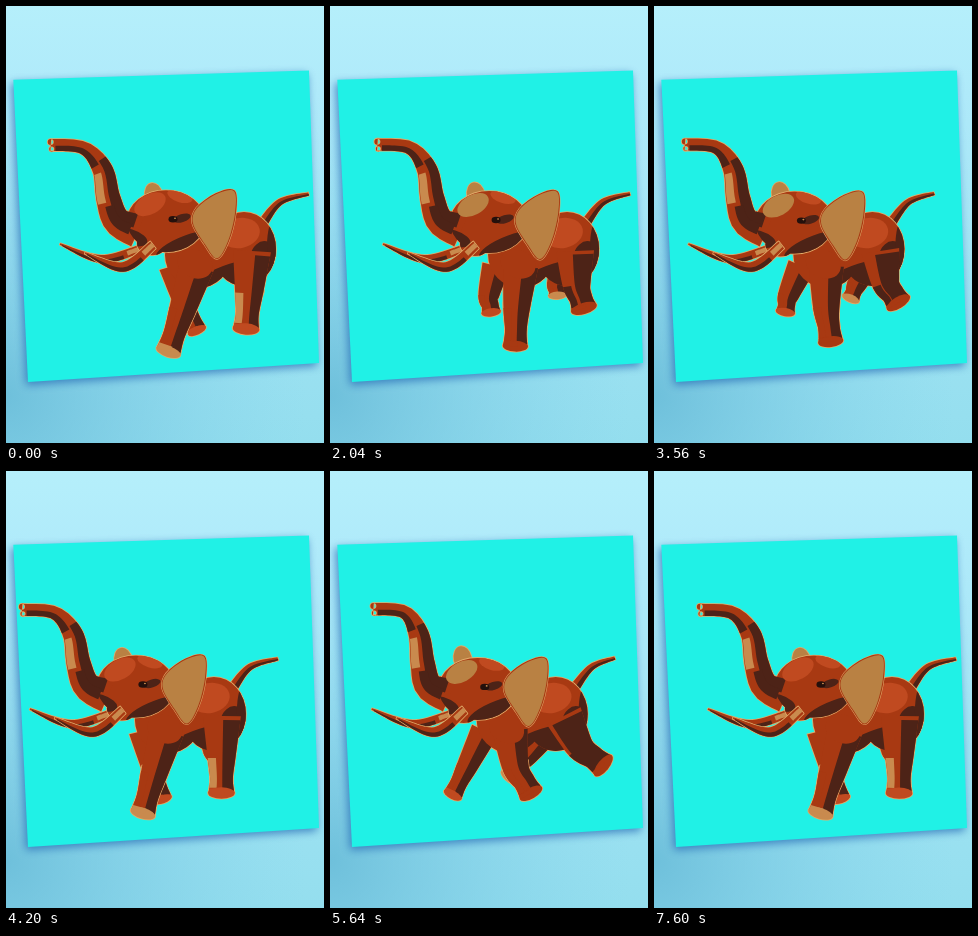
Write an HTML page with a canvas that moves like this. It is 318 by 437 pixels and loops after 7680 ms.

```html
<!DOCTYPE html>
<html lang="en">
<head>
<meta charset="utf-8">
<title>Running elephant</title>
<style>
html, body { margin: 0; width: 100%; height: 100%; overflow: hidden; background: #9fe0f2; }
canvas { display: block; width: 318px; height: 437px; }
</style>
</head>
<body>
<canvas id="stage"></canvas>
<script>
const W = 318, H = 437, LOOP = 7680, STEP = 40, STRIDES = 5;
const canvas = document.getElementById('stage');
const ctx = canvas.getContext('2d');
const ratio = window.devicePixelRatio || 1;
canvas.width = W * ratio;
canvas.height = H * ratio;

const DARK = '#4d2317', RED = '#a83912', ORANGE = '#c04a20', TAN = '#b98143', PALE = '#c98a4e', EDGE = '#e0ac6a';

// Each foot runs round an ellipse; swing and drop are the phases of its foremost and lowest points.
const LEGS = {
  farHind: { hip: [235, 255], foot: [221, 296], reach: 33, lift: 10, swing: .57, drop: .65, width: 13 },
  farFront: { hip: [167, 260], foot: [161, 319], reach: 31, lift: 13, swing: .54, drop: .82, width: 14 },
  nearHind: { hip: [246, 245], foot: [262, 306], reach: 25, lift: 17, swing: .08, drop: 0, width: 19 },
  nearFront: { hip: [192, 256], foot: [189, 335], reach: 28, lift: 13, swing: .05, drop: .1, width: 18 }
};

const wave = x => Math.cos(2 * Math.PI * x);
const bell = (t, mid, spread) => Math.exp(-(((t - mid) / spread) ** 2));
const mix = (a, b, k) => a + (b - a) * k;

// Steady running that lags a little, then hurries while the animal moves forward.
const stride = t => STRIDES * t / LOOP - .08 * Math.sin(Math.PI * t / LOOP) ** 2 + .29 * bell(t, 4250, 680);
const drift = t => -31 * bell(t, 4420, 1270);

function oval(x, y, rx, ry, turn = 0) {
  const path = new Path2D();
  path.ellipse(x, y, rx, ry, turn, 0, 7);
  return path;
}

function join(...paths) {
  const all = new Path2D();
  paths.forEach(p => all.addPath(p));
  return all;
}

// smooth closed shape through points
function blob(...pts) {
  const n = pts.length, path = new Path2D(), at = i => pts[(i + n) % n];
  path.moveTo(...pts[0]);
  for (let i = 0; i < n; i++) {
    const [a, b, c, d] = [at(i - 1), at(i), at(i + 1), at(i + 2)];
    path.bezierCurveTo(b[0] + (c[0] - a[0]) / 6, b[1] + (c[1] - a[1]) / 6,
      c[0] - (d[0] - b[0]) / 6, c[1] - (d[1] - b[1]) / 6, c[0], c[1]);
  }
  path.closePath();
  return path;
}

// position and half width on a curve through [x, y, halfWidth]
function spline(pts, s) {
  const n = pts.length - 1, pos = s * n, i = Math.min(n - 1, Math.floor(pos)), u = pos - i;
  const b = pts[i], c = pts[i + 1], a = pts[i - 1] || b, d = pts[i + 2] || c;
  return b.map((v, j) => v + .5 * u * (c[j] - a[j] +
    u * (2 * a[j] - 5 * v + 4 * c[j] - d[j] + u * (3 * (v - c[j]) + d[j] - a[j]))));
}

// strip of a tapered tube: u runs across (-1..1), s runs along (0..1)
function tube(pts, u0 = -1, u1 = 1, s0 = 0, s1 = 1) {
  const left = [], right = [], n = 22;
  for (let i = 0; i <= n; i++) {
    const s = mix(s0, s1, i / n), [x, y, w] = spline(pts, s);
    const p = spline(pts, Math.max(0, s - .01)), q = spline(pts, Math.min(1, s + .01));
    const dx = q[0] - p[0], dy = q[1] - p[1], len = Math.hypot(dx, dy) || 1;
    const nx = dy / len * w, ny = -dx / len * w;
    left.push([x + nx * u0, y + ny * u0]);
    right.unshift([x + nx * u1, y + ny * u1]);
  }
  const path = new Path2D();
  left.concat(right).forEach(p => path.lineTo(...p));
  path.closePath();
  return path;
}

function fill(path, color) {
  ctx.fillStyle = color;
  ctx.fill(path);
}

function rim(path, width = 1.6, color = EDGE) {
  ctx.strokeStyle = color;
  ctx.lineWidth = width;
  ctx.stroke(path);
}

function inside(path, ...patches) {
  ctx.save();
  ctx.clip(path);
  patches.forEach(([color, shape]) => fill(shape, color));
  ctx.restore();
}

function poseLeg({ hip, foot, reach, lift, swing, drop, width }, phase) {
  const low = wave(phase - drop), bend = .5 - .5 * low;
  const fx = foot[0] - reach * wave(phase - swing), fy = foot[1] + lift * low;
  const kx = mix(hip[0], fx, .5) - 5 * bend, ky = mix(hip[1], fy, .5) + 2 + 4 * bend;
  const pts = [[...hip, width], [kx, ky, width * .74],
    [mix(kx, fx, .6), mix(ky, fy, .6), width * .6], [fx, fy, width * .68]];
  const sole = oval(fx, fy, width * .7, width * .3, Math.atan2(fy - ky, fx - kx) - Math.PI / 2);
  return { pts, sole, shape: join(tube(pts), sole) };
}

function drawLeg({ pts, sole }, shade, toe, lit = RED) {
  fill(tube(pts), RED);
  fill(tube(pts, -1, -.4, .35, .85), lit);
  fill(tube(pts, shade, 1, .05, .92), DARK);
  fill(sole, toe);
  fill(tube(pts, -1, .2, .86, 1), toe);
}

function drawBackdrop() {
  let g = ctx.createLinearGradient(0, 0, 0, H);
  g.addColorStop(0, '#b5effb');
  g.addColorStop(.2, '#afeafa');
  g.addColorStop(1, '#94deee');
  ctx.fillStyle = g;
  ctx.fillRect(0, 0, W, H);
  g = ctx.createRadialGradient(0, 390, 0, 0, 390, 300);
  g.addColorStop(0, 'rgba(100,184,214,.8)');
  g.addColorStop(1, 'rgba(130,210,236,0)');
  ctx.fillStyle = g;
  ctx.fillRect(0, 0, W, H);
  ctx.save();
  ctx.shadowColor = 'rgba(35,105,180,.75)';
  ctx.shadowBlur = 9 * ratio;
  ctx.shadowOffsetX = -2 * ratio;
  ctx.shadowOffsetY = 3 * ratio;
  fill(new Path2D('M7.3 73.8L303 64.4L313 357L22 376Z'), '#20f1e6');
  ctx.restore();
}

function drawTusk(pts) {
  const shape = tube(pts);
  rim(shape);
  fill(shape, RED);
  fill(tube(pts, .1, 1, .25, .95), DARK);
  fill(tube(pts, -.6, .5, 0, .2), PALE);
}

function drawTrunk(pts, head) {
  const [x, y] = pts[0];
  const shape = join(tube(pts), oval(x, y - 3, 3, 3), oval(x + 1, y + 4, 2.5, 2.5));
  rim(shape);
  rim(head);
  fill(head, RED);
  fill(shape, RED);
  fill(tube(pts, -1, -.1, .04, .36), DARK);
  fill(tube(pts, .1, 1, .34, .94), DARK);
  fill(tube(pts, -.4, .3, .66, .92), DARK);
  fill(tube(pts, -.95, -.25, .42, .63), PALE);
}

function drawHead(k) {
  const y = 3 * k;
  const head = join(oval(160, 215 + y, 39, 31), oval(146, 237 + y, 15, 12));
  const trunk = [[44 + 12 * k, 139 - k, 6], [77 + 10 * k, 142 - k, 6.5], [96 + 5 * k, 163, 10],
    [102 + 3 * k, 192, 12], [111, 215, 14], [132, 225, 17]];
  const farEar = oval(148 - 3 * k, 190 - 2 * k, 9, 13, -.2);
  const ear = blob([228, 185 + y], [229, 207 + y], [222, 235 + y], [211, 252 + y],
    [199, 238 + y], [187, 217 + y], [191, 202 + y], [210, 188 + y]);

  rim(farEar);
  fill(farEar, TAN);
  drawTusk([[134, 243, 4], [95, 253, 4], [54, 238, .8]]);
  drawTrunk(trunk, head);
  inside(head,
    [k > .35 ? TAN : ORANGE, oval(144, 198 + y, 17, 10, -.5)],
    [ORANGE, oval(174, 190 + y, 13, 6, .3)],
    [DARK, oval(124, 231 + y, 18, 8, .3)],
    [DARK, oval(182, 240, 34, 11, -.35)],
    [DARK, oval(176, 212 + y, 9, 4, -.3)]);
  fill(oval(167, 213 + y, 4.5, 3.2), '#24100c');
  fill(oval(169, 212 + y, 1, .8), PALE);

  rim(ear, 3);
  rim(ear, 2, RED);
  fill(ear, TAN);
  drawTusk([[147, 239, 4.5], [117, 261, 4.8], [79, 247, .8]]);
}

function drawElephant(phase) {
  const k = .5 - .5 * wave(phase - .08), stretched = k > .35;
  const legs = {};
  for (const name in LEGS) legs[name] = poseLeg(LEGS[name], phase);
  const { farHind, farFront, nearHind, nearFront } = legs;
  const tail = [[256, 218, 5], [274, 196, 3.2], [303 - 6 * k, 188 - k, 1.6]];
  const body = join(oval(238, 243, 32, 37), oval(192, 249, 33, 33));

  rim(tube(tail));
  fill(tube(tail), RED);
  fill(tube(tail, -1, 0), DARK);

  Object.values(legs).forEach(leg => rim(leg.shape));
  rim(body);
  drawLeg(farHind, .1, PALE);
  drawLeg(farFront, .05, ORANGE);
  fill(body, RED);
  inside(body,
    [ORANGE, oval(234, 227, 20, 15, -.2)],
    [DARK, oval(228, 272, 42, 15, -.3)],
    [DARK, oval(257, 252, 13, 17, .2)],
    [DARK, oval(268, 240, 7, 26)]);

  rim(tube(nearHind.pts, -1, 1, .5, 1));
  drawLeg(nearHind, mix(.25, -.8, k), stretched ? RED : ORANGE, stretched ? DARK : PALE);
  rim(tube(nearFront.pts, -1, 1, .3, 1));
  drawLeg(nearFront, mix(.05, .2, k), stretched ? RED : PALE);
  fill(oval(189, 258, 18, 14, .4), RED);
  drawHead(k);
}

function draw(time) {
  const t = Math.min(LOOP - 2 * STEP, Math.floor((time % LOOP) / STEP) * STEP);
  ctx.setTransform(ratio, 0, 0, ratio, 0, 0);
  ctx.lineJoin = 'round';
  drawBackdrop();
  ctx.translate(drift(t), 0);
  drawElephant(stride(t) % 1);
}

const start = performance.now();
function tick() {
  draw(Math.max(0, performance.now() - start));
  requestAnimationFrame(tick);
}
tick();
</script>
</body>
</html>
```
